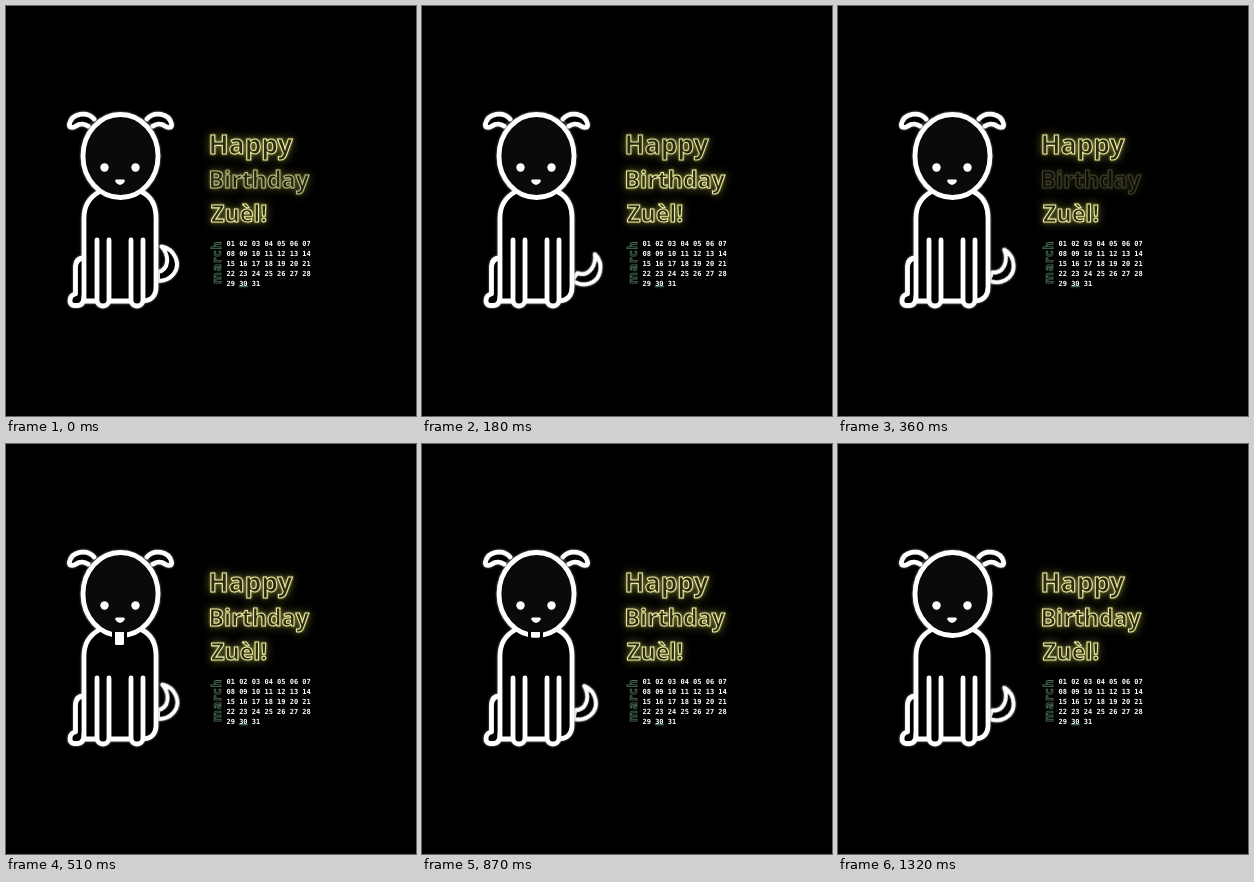
Animation of 410 by 410 pixels, one loop 1350 ms. Source, as an HTML page:

```html
<!DOCTYPE html>
<html lang="en">
<head>
<meta charset="utf-8">
<title>Birthday card</title>
<style>
html, body { margin: 0; width: 100%; height: 100%; overflow: hidden; background: #000; }
svg { display: block; width: 100vw; height: 100vh; }
.line { fill: #000; stroke: #fff; stroke-width: 4.8; stroke-linecap: round; stroke-linejoin: round; }
.soft { filter: drop-shadow(0 0 .8px #888); }
.neon {
  font-family: "Open Sans", "Noto Sans", sans-serif; font-weight: 700;
  fill: #2c2c14; stroke: #ececa6; stroke-width: 1.1;
  filter: drop-shadow(0 0 1.2px #8c8c3c) drop-shadow(0 0 4px #5c5c28);
}
.month {
  font: 700 12px "Open Sans", "Noto Sans", sans-serif; letter-spacing: 1px;
  fill: #050d07; stroke: #4f7259; stroke-width: .8;
}
.days { font: 700 7px "DejaVu Sans Mono", monospace; fill: #fff; white-space: pre; }
</style>
</head>
<body>
<svg viewBox="0 0 410 410">
  <defs>
    <clipPath id="mouth"><rect x="100" y="188" width="30" height="20"/></clipPath>
    <path id="ear" d="M88 113C81 105 66 107 63.500 118C63 122 67 122 70 120C74 117 79 118 82 120"/>
    <path id="leg" d="M91 234V294a6 6 0 0 0 12 0V234"/>
  </defs>

  <g id="tail" class="soft">
    <path class="line" style="stroke-width:4" d="M155.500 240.500C168.500 243 175.500 258 167.500 268C163.500 273 159 275 152 275V266C163 264 164 250 155.500 240.500Z"/>
  </g>
  <g class="line soft">
    <path d="M78 252C72 252 69.500 256 69.500 262V288C63 289 62 299 68 299.500H72C77 299 78 295 78 290"/>
    <path d="M93 186C84 191 78 200 78 212V295H136C145 295 150 290 150 281V212C150 200 146 191 136 186"/>
    <use href="#leg"/>
    <use href="#leg" x="34"/>
    <use href="#ear"/>
    <use href="#ear" transform="matrix(-1 0 0 1 229 0)"/>
    <ellipse cx="114.500" cy="150" rx="37.500" ry="41.500" fill="#0a0a0a"/>
  </g>
  <g fill="#fff">
    <circle cx="98.500" cy="161.500" r="4.200"/>
    <circle cx="129.500" cy="161.500" r="4.200"/>
    <path d="M110 173.500H118Q119.500 174 118.500 176Q114 182 109.500 176Q108.500 174 110 173.500Z"/>
  </g>
  <g clip-path="url(#mouth)">
    <rect id="tongue" x="107.500" width="12" height="26" rx="3" fill="#fff" stroke="#000" stroke-width="3"/>
  </g>

  <text id="happy" class="neon" x="202.500" y="148" font-size="26.400">Happy</text>
  <text id="birthday" class="neon" x="202.500" y="182.300" font-size="23.200">Birthday</text>
  <text class="neon" x="205" y="215.500" font-size="23.200">Zuèl!</text>
  <text class="month" transform="translate(215 278) rotate(-90)">march</text>
  <path d="M233 280.500H242" stroke="#3a7a4c" stroke-width=".8" class="soft"/>
  <g id="days" class="days"></g>
</svg>
<script>
const LOOP = 1350, STEP = 30, WAG = 480;
const $ = id => document.getElementById(id);

// [time, value] pairs, linear in between
const tongueKeys = [[0, 0], [360, 0], [510, 1], [540, 1], [1080, 0], [LOOP, 0]];
const birthdayKeys = [[0, .8], [60, .9], [180, 1], [270, .9], [360, .27], [420, .4], [510, 1], [LOOP, 1]];
const happyKeys = [[0, 1], [120, .9], [240, 1], [LOOP, 1]];

function at(keys, t) {
  const i = keys.findIndex(k => k[0] > t);
  const [t0, a] = keys[i - 1], [t1, b] = keys[i];
  return a + (b - a) * (t - t0) / (t1 - t0);
}

for (let row = 0; row < 5; row++) {
  const text = document.createElementNS("http://www.w3.org/2000/svg", "text");
  const days = [];
  for (let d = row * 7 + 1; d <= Math.min(31, row * 7 + 7); d++) days.push(String(d).padStart(2, "0"));
  text.setAttribute("x", 220.5);
  text.setAttribute("y", 240 + row * 10);
  text.textContent = days.join(" ");
  $("days").append(text);
}

function draw(now) {
  const t = Math.floor(now % LOOP / STEP) * STEP;
  const angle = 20.5 * (1 - Math.cos(2 * Math.PI * t / WAG));
  $("tail").setAttribute("transform", `rotate(${angle} 152 272)`);
  const out = at(tongueKeys, t);
  $("tongue").setAttribute("visibility", out > 0 ? "visible" : "hidden");
  $("tongue").setAttribute("y", 164.5 + 12 * out);
  $("birthday").style.opacity = at(birthdayKeys, t);
  $("happy").style.opacity = at(happyKeys, t);
}

const start = performance.now();
function tick() {
  draw(performance.now() - start);
  requestAnimationFrame(tick);
}
tick();
</script>
</body>
</html>
```
